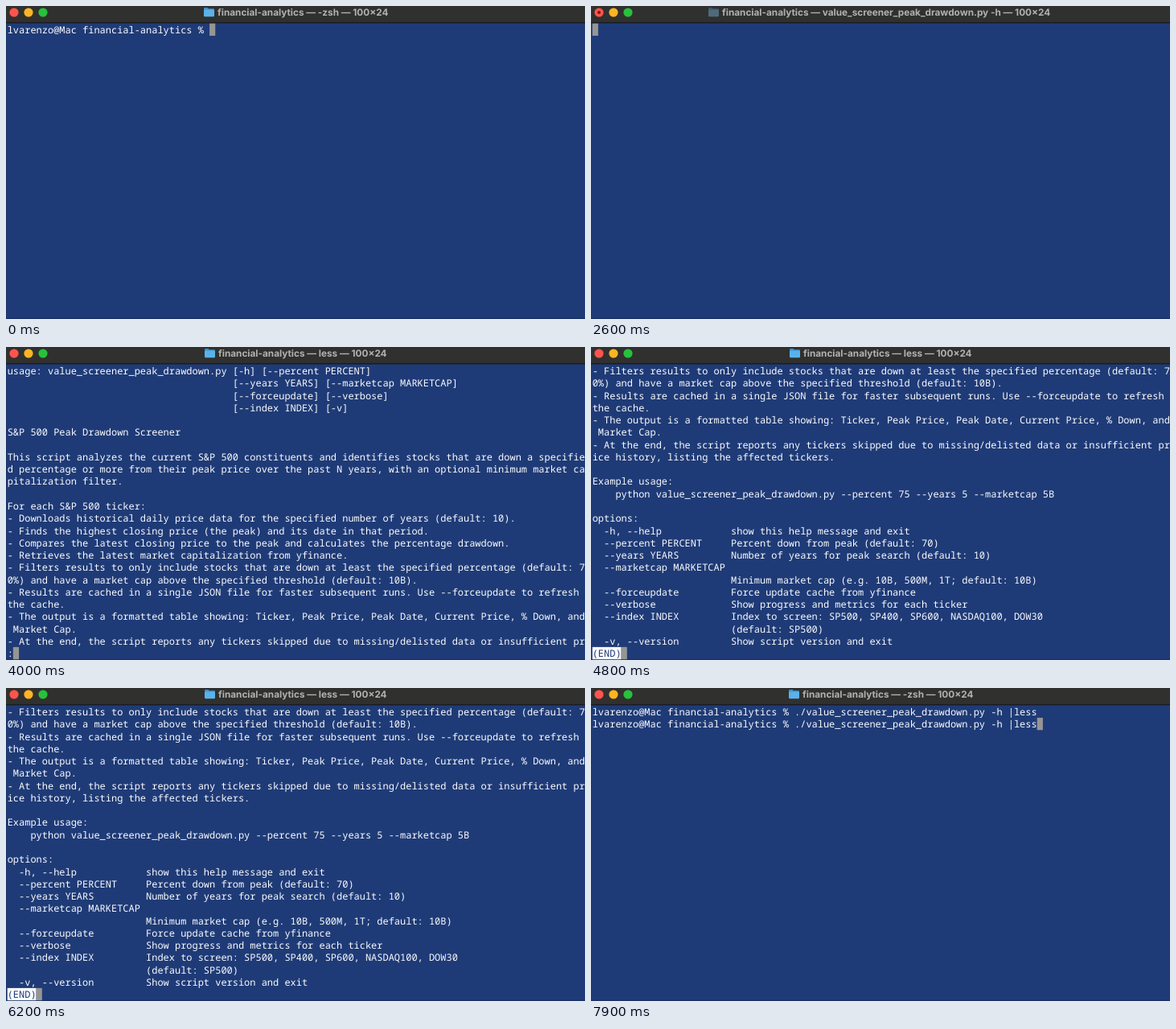
An HTML page for the animation above (8000 ms loop, 720 by 389 pixels).

```html
<!DOCTYPE html>
<html lang="en">
<head>
<meta charset="utf-8">
<title>Terminal session</title>
<style>
  html, body { margin: 0; width: 100%; height: 100%; overflow: hidden; background: #1f3b77; }
  svg { display: block; width: 720px; height: 389px; }
  text { white-space: pre; text-rendering: geometricPrecision; }
  #rows { font: 500 11.97px "Noto Sans Mono", "DejaVu Sans Mono", monospace; fill: #fafbfd; }
  #title { font: 700 11.75px Inter, "Liberation Sans", sans-serif; fill: #b2b2b0; }
</style>
</head>
<body>
<svg viewBox="0 0 720 389">
  <rect width="720" height="389" fill="#1f3b77"/>
  <rect width="1" height="389" fill="#1a3266"/>
  <rect y="387.5" width="720" height="1.5" fill="#1a3266"/>
  <rect width="720" height="21" fill="#30302f"/>
  <rect y="20" width="720" height="1.5" fill="#1b1d22"/>
  <circle cx="10" cy="8" r="5.6" fill="#fe544d"/>
  <circle id="dot" cx="10" cy="8" r="2" fill="#7d150f"/>
  <circle cx="28" cy="8" r="5.6" fill="#fdb524"/>
  <circle cx="46" cy="8" r="5.6" fill="#27c13b"/>
  <g id="folder">
    <path d="M0 3.2q0-1.2 1.2-1.2h3.2l1.4 1.3h6q1.2 0 1.2 1.2v3h-13z" fill="#3b93cf"/>
    <rect y="4.6" width="13" height="8.6" rx="1.2" fill="#5ab2ea"/>
  </g>
  <text id="title" y="12"></text>
  <rect id="mark" fill="#fafbfd"/>
  <rect id="cursor" fill="#979593"/>
  <g id="rows"></g>
</svg>
<script>
const LOOP = 8000, COL = 7.182, ROW = 15.27, LEFT = 1.7, TOP = 21.7;
const $ = id => document.getElementById(id);

const prompt = "lvarenzo@Mac financial-analytics % ";
const script = "value_screener_peak_drawdown.py";
const command = `./${script} -h `;
const piped = command + "|less";
const pad = " ".repeat(39);
const opt = (flag, help) => ("  " + flag).padEnd(24) + help;

const doc = [
  `usage: ${script} [-h] [--percent PERCENT]`,
  pad + "[--years YEARS] [--marketcap MARKETCAP]",
  pad + "[--forceupdate] [--verbose]",
  pad + "[--index INDEX] [-v]",
  "",
  "S&P 500 Peak Drawdown Screener",
  "",
  "This script analyzes the current S&P 500 constituents and identifies stocks that are down a specifie",
  "d percentage or more from their peak price over the past N years, with an optional minimum market ca",
  "pitalization filter.",
  "",
  "For each S&P 500 ticker:",
  "- Downloads historical daily price data for the specified number of years (default: 10).",
  "- Finds the highest closing price (the peak) and its date in that period.",
  "- Compares the latest closing price to the peak and calculates the percentage drawdown.",
  "- Retrieves the latest market capitalization from yfinance.",
  "- Filters results to only include stocks that are down at least the specified percentage (default: 7",
  "0%) and have a market cap above the specified threshold (default: 10B).",
  "- Results are cached in a single JSON file for faster subsequent runs. Use --forceupdate to refresh",
  "the cache.",
  "- The output is a formatted table showing: Ticker, Peak Price, Peak Date, Current Price, % Down, and",
  " Market Cap.",
  "- At the end, the script reports any tickers skipped due to missing/delisted data or insufficient pr",
  "ice history, listing the affected tickers.",
  "",
  "Example usage:",
  `    python ${script} --percent 75 --years 5 --marketcap 5B`,
  "",
  "options:",
  opt("-h, --help", "show this help message and exit"),
  opt("--percent PERCENT", "Percent down from peak (default: 70)"),
  opt("--years YEARS", "Number of years for peak search (default: 10)"),
  "  --marketcap MARKETCAP",
  opt("", "Minimum market cap (e.g. 10B, 500M, 1T; default: 10B)"),
  opt("--forceupdate", "Force update cache from yfinance"),
  opt("--verbose", "Show progress and metrics for each ticker"),
  opt("--index INDEX", "Index to screen: SP500, SP400, SP600, NASDAQ100, DOW30"),
  opt("", "(default: SP500)"),
  opt("-v, --version", "Show script version and exit")
];

const shell = { name: "-zsh", x: 246 };
const busy = { name: `${script} -h`, x: 146, busy: true };
const pager = { name: "less", x: 247 };

// Typed text at each key press; the script name is tab-completed.
const typed = [
  [0, ""], [400, "."], [500, "./"], [600, "./v"], [700, "./va"], [800, "./val"],
  [900, `./${script} `], [1000, `./${script} -`], [1100, `./${script} -h`], [1200, command],
  [1500, command + "|"], [1700, command + "|l"], [1900, command + "|le"],
  [2000, command + "|les"], [2200, piped]
];

// [start ms, window title, visible lines]; the cursor follows the last line.
const steps = [
  ...typed.map(([at, text]) => [at, shell, [prompt + text]]),
  [2400, busy, [""]],
  [3000, pager, [...doc.slice(0, 23), ":"]],
  [4800, pager, [...doc.slice(16), "(END)"]],
  [6600, pager, [prompt + piped, prompt]],
  [7400, shell, [prompt + piped, prompt + piped]]
];

const rows = Array.from({ length: 24 }, (_, i) => {
  const el = document.createElementNS("http://www.w3.org/2000/svg", "text");
  el.setAttribute("x", LEFT);
  el.setAttribute("y", TOP + 12.3 + i * ROW);
  return $("rows").appendChild(el);
});

function cells(el, col, row, count) {
  const box = { x: LEFT + col * COL, y: TOP + row * ROW, width: count * COL, height: ROW };
  for (const key in box) el.setAttribute(key, box[key]);
}

function show([, win, lines]) {
  const last = lines.length - 1, tail = lines[last], end = tail === "(END)";
  rows.forEach((el, i) => {
    el.textContent = lines[i] || "";
    el.style.fill = end && i === last ? "#1f3b77" : "";
  });
  cells($("cursor"), tail.length, last, 1);
  cells($("mark"), 0, last, end ? tail.length : 0);
  $("title").textContent = `financial-analytics — ${win.name} — 100×24`;
  $("title").setAttribute("x", win.x + 17);
  $("folder").setAttribute("transform", `translate(${win.x} 0)`);
  $("folder").style.filter = win.busy ? "saturate(.5) brightness(.62)" : "";
  $("dot").style.display = win.busy ? "" : "none";
}

const start = performance.now();
let current;
function tick() {
  const t = (performance.now() - start) % LOOP;
  const step = steps.findLast(s => s[0] <= t);
  if (step !== current) show(current = step);
  requestAnimationFrame(tick);
}
tick();
</script>
</body>
</html>
```
